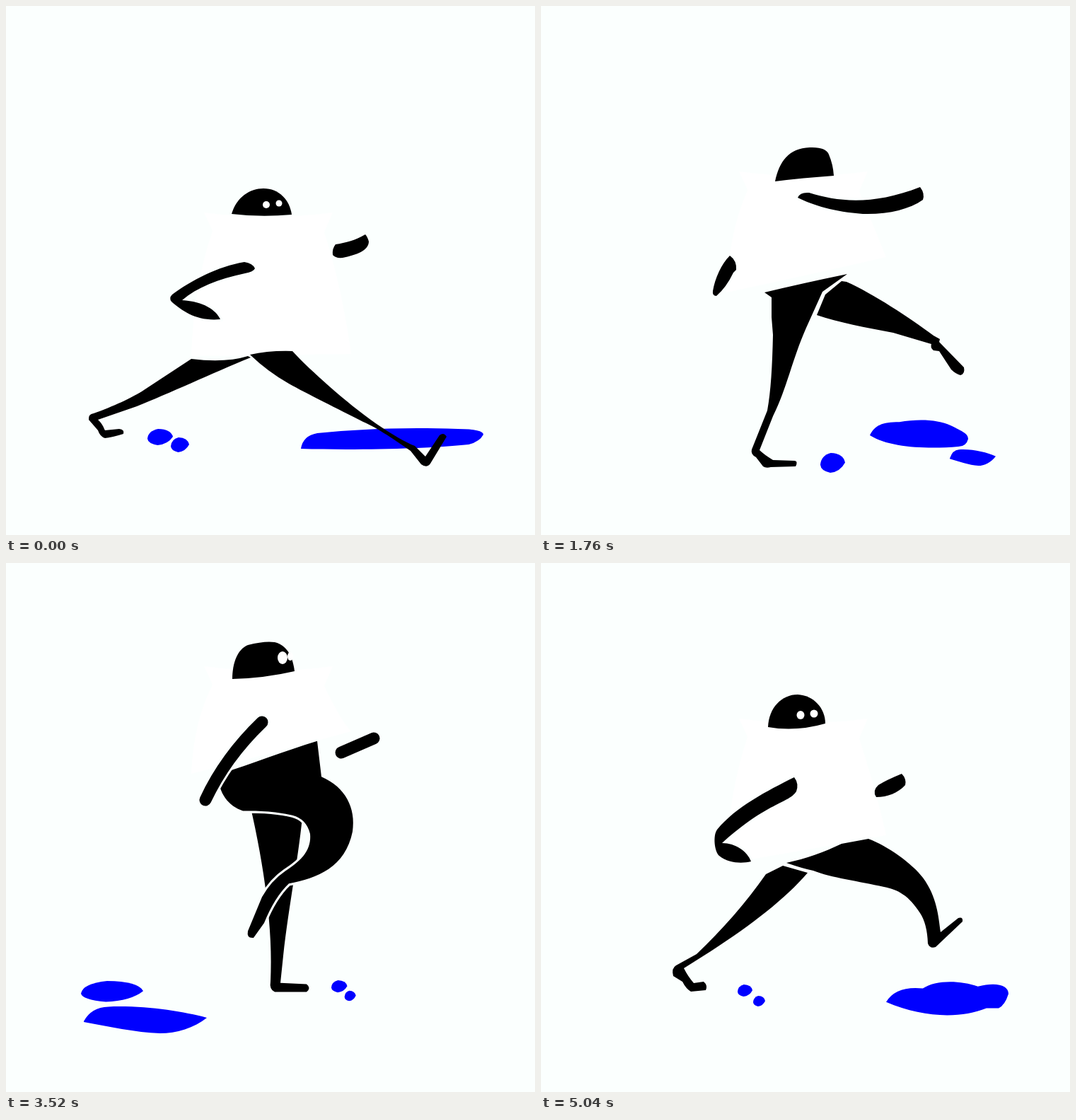
An HTML page with a canvas for the animation above (5120 ms loop, 748x748 px).

```html
<!DOCTYPE html>
<html lang="en">
<head>
<meta charset="utf-8">
<title>Walk cycle</title>
<style>
html, body { margin: 0; width: 100%; height: 100%; overflow: hidden; background: #fbfffe; }
canvas { display: block; width: 748px; height: 748px; }
</style>
</head>
<body>
<canvas id="stage" width="748" height="748"></canvas>
<script>
const ctx = document.getElementById('stage').getContext('2d');
const PAPER = '#fbfffe', INK = '#000', WATER = '#00f';
const STEP = 80, CYCLE = 16;

// Eight leg poses make one step; the second step repeats them on the other side.
// legs: [drawn behind, drawn in front]; hem: shirt edge at left and right.
const POSES = [
  { top: 258, hem: [495, 492], pivot: 495, legs: [
    'M262 499Q310 505 342 495L346 497C290 520 230 548 185 566L130 585C136 590 138 596 140 600L160 598Q168 599 166 605Q150 610 140 611Q133 609 130 600L117 585Q116 577 124 576C150 567 180 553 195 543Q230 520 262 499Z',
    'M345 493Q372 487 405 488C430 515 480 560 524 591C548 607 565 617 578 622L593 637L613 607Q619 602 623 609L600 647Q595 654 587 648L572 629C545 610 520 594 505 588C470 570 425 548 400 534Q370 517 345 493Z'] },
  { top: 258, hem: [498, 475], pivot: 490, legs: [
    'M262 497Q320 500 345 510C300 540 240 555 190 561L150 595Q140 600 138 592L180 550Q230 530 262 497Z',
    'M300 492Q370 488 425 478C455 520 505 565 527 600Q545 628 556 642L596 644Q604 648 598 655L552 656Q543 650 538 638C515 605 490 592 470 575C430 545 380 525 340 505Z'] },
  { top: 235, hem: [430, 414], pivot: 425, legs: [
    'M367 492L383 506L362 515C335 524 310 529 287 532Q260 550 238 564Q230 570 226 563Q225 557 232 553L275 527Q278 519 290 520C315 516 330 512 340 510Q355 498 367 492ZM399 422L442 418L436 434ZM417 455L438 456L438 479Z',
    'M294 431Q330 431 365 426L374 440L412 455L436 485L460 535L480 575L497 625Q505 642 512 645L545 644Q554 645 554 651Q550 656 540 656L505 656Q497 655 490 640C475 615 465 590 455 575C430 552 405 525 390 505Q375 485 360 474C340 474 320 464 308 455Q296 443 294 431Z'] },
  { top: 172, hem: [375, 345], pivot: 365, legs: [
    'M368 440L405 478Q408 500 385 505C350 515 330 525 310 555L285 578Q276 580 277 571C295 540 320 505 350 490Q365 470 368 440Z',
    'M300 375Q370 366 440 352L444 400C456 460 458 540 461 600L463 644L502 645Q508 651 500 656L455 656Q447 652 447 640C440 590 425 530 395 470Q375 440 350 425C315 415 300 400 300 375Z'] },
  { top: 129, hem: [315, 255], pivot: 295, legs: [
    'M345 365L420 372C415 440 400 520 392 600L388 642L425 644Q432 650 425 656L380 656Q372 652 374 640C378 560 365 460 345 365Z',
    'M300 315C350 300 395 283 440 270L446 318C480 332 495 360 490 392C480 440 440 455 400 462Q380 480 365 515L350 535Q340 536 342 526L362 480Q375 458 395 445C420 430 432 415 430 395Q425 375 405 370C380 364 350 364 335 364C315 358 300 340 300 315Z'] },
  { top: 135, hem: [325, 250], pivot: 300, legs: [
    'M350 369L380 369Q405 370 416 381C413 405 405 435 400 450Q388 458 386 467L384 484C370 510 360 520 353 535Q340 570 315 592L355 595Q362 600 358 606L318 607Q310 606 302 594Q299 587 305 583C330 555 350 520 352 450Q354 400 350 369Z',
    'M302 320C350 304 395 287 442 276L444 322Q460 325 466 330C490 335 504 355 504 378C495 420 460 452 417 455Q402 460 398 475L390 513Q387 519 381 518Q378 515 379 507L386 470Q390 458 400 452C420 437 440 420 441 395Q440 378 425 375C405 366 380 363 345 366C320 362 300 345 302 320Z'] },
  { top: 200, hem: [405, 355], pivot: 390, legs: [
    'M316 405L326 412L326 440L328 465C327 510 325 545 320 572L298 627Q296 634 304 638L314 651Q318 654 325 652L360 651Q364 643 358 643L328 642Q315 634 309 628L328 580C348 540 355 500 375 455L398 404L433 379Q370 392 316 405Z',
    'M425 389L432 390C470 407 520 440 555 466L564 471L563 475L598 511Q600 520 593 522Q586 520 580 514L563 488L555 487Q550 483 552 478L498 462C460 455 420 447 390 437L402 408Z'] },
  { top: 186, hem: [425, 385], pivot: 425, legs: [
    'M318 440L342 428L377 438C345 475 300 510 240 549L202 573Q208 585 216 594L230 592Q236 597 233 604L212 606Q205 602 200 592L187 584Q184 573 191 569L220 553C255 520 290 480 318 440Z',
    'M347 424C375 418 400 409 425 397L463 390C490 400 525 425 540 445C560 472 562 500 565 522L590 502Q597 500 596 507L558 543Q550 546 547 538Q546 510 536 495C520 470 505 462 485 458C450 450 410 445 385 435Q370 432 347 424Z'] }
];

// Vertical stretch of each leg, because the two feet follow separate ground lines.
const STRETCH = { 5: [1.1, 1], 7: [1.09, 1], 8: [1.45, .7], 9: [1.35, .7], 10: [1.2, .775],
  11: [1.1, .856], 12: [.91, 1.05], 14: [.96, 1] };

const TOPS = [258, 258, 235, 172, 129, 152, 200, 215, 262, 258, 238, 165, 112, 135, 165, 186];

const HEADS = [
  [258, 'M319 294C326 270 345 258 364 258C386 258 401 274 404 295Q360 299 319 294Z'],
  [235, 'M328 285C328 262 332 235 366 235C392 235 402 255 409 280Q370 285 345 281Q335 282 328 285Z'],
  [200, 'M331 248C337 220 350 201 380 200Q403 199 407 210Q413 224 414 240Q370 243 331 248Z'],
  [135, 'M320 187C320 165 327 145 342 139Q365 133 380 135C400 140 406 160 408 176Q365 186 320 187Z'],
  [186, 'M321 232C322 205 340 186 363 186C385 187 402 205 402 227Q360 239 321 232Z']
];
const HEAD_AT = [0, 0, 1, 1, 2, 2, 2, 2, 2, 2, 2, 2, 3, 3, 4, 4];

// Per step: x, distance below the head top, x radius, y radius.
const EYES = {
  0: [[368, 23, 5, 5], [386, 21, 4.5, 4.5]],
  1: [[377, 24, 6, 6], [393, 23, 5, 5]],
  2: [[388, 37, 8, 8], [402, 37, 5.5, 6.5]],
  3: [[399, 37, 6, 7]],
  12: [[391, 22, 7, 9], [402, 20, 4, 6]],
  13: [[380, 21, 8, 10], [394, 19, 6.5, 7]],
  14: [[373, 27, 6, 7], [389, 24, 5.5, 6]],
  15: [[367, 29, 5.5, 6], [386, 27, 5.5, 5.5]]
};

// Closed paths are filled, open ones are drawn with a round brush.
const NEAR_ARM = [
  'M352 371Q349 364 337 362C300 368 262 388 235 408Q230 413 234 418C250 432 270 446 303 443C297 430 280 418 249 416C270 398 300 386 338 378Q350 376 352 371Z',
  'M345 370Q280 395 265 428L325 446',
  'M356 359C366 376 374 395 386 414C395 424 430 430 457 451C430 458 390 447 374 432C357 414 345 390 347 373Q349 363 356 359Z',
  'M357 295Q365 360 435 380',
  'M360 208Q385 268 460 272',
  'M367 228Q425 272 510 245',
  'M363 271Q366 263 379 264C420 277 470 282 536 256Q543 265 540 274C520 288 490 295 455 294C415 291 385 282 363 271Z',
  'M367 300Q430 328 510 286',
  'M362 345Q430 390 490 350',
  'M358 345Q400 415 475 400',
  'M355 345Q375 420 430 438',
  'M355 250Q350 320 375 380',
  'M362 225Q310 275 282 335',
  'M364 246Q372 252 371 261Q368 268 350 276C310 295 265 320 225 357Q226 342 238 330C275 295 320 270 364 246Z',
  'M356 282Q290 310 240 372',
  'M358 303Q365 312 361 323C350 340 320 338 256 396C275 396 292 408 297 422C285 425 265 425 252 414C245 408 243 385 249 377C275 345 320 322 358 303Z'
];
const FAR_ARM = {
  0: 'M508 323C495 331 480 335 466 337Q461 343 462 352Q466 357 476 356C495 352 513 346 513 333Q511 326 508 323Z',
  1: 'M474 372L496 368',
  5: 'M264 306L243 352',
  6: 'M267 353Q277 360 276 373L272 377Q262 398 248 410Q242 410 243 403C246 385 255 365 267 353Z',
  7: 'M258 372L241 412',
  8: 'M247 420L244 445',
  12: 'M474 268L520 248',
  13: 'M545 231Q549 238 548 247C535 270 505 280 472 279Q468 276 474 272Q500 260 545 231Z',
  14: 'M482 296L523 273',
  15: 'M510 298Q517 305 515 314C505 325 490 331 474 331Q468 322 477 314Q488 307 510 298Z'
};

// Puddle outlines in a unit box.
const SHAPES = {
  puddle: 'M0 .55C.05 .2 .12 .08 .3 .08C.5 -.04 .7 0 .82 .2C.95 .42 1 .5 1 .68Q.98 .95 .9 .95C.6 1.04 .2 1 0 .55Z',
  bumpy: 'M0 .6Q.08 .12 .3 .2C.4 -.05 .6 -.05 .75 .14C.9 0 1 .1 1 .36Q.97 .7 .92 .78L.82 .78C.6 1.1 .3 1.06 0 .6Z',
  slab: 'M0 .97Q.01 .35 .09 .23C.32 .04 .55 -.06 .86 .03Q1 .04 1 .3Q.98 .63 .92 .77C.7 .97 .3 1.05 0 .97Z',
  leaf: 'M0 .55Q.06 .03 .2 .01C.5 -.04 .8 .18 1 .42C.9 .8 .75 1 .62 1C.42 .97 .2 .75 0 .58Z',
  pebble: 'M0 .6Q.03 .12 .42 0Q.92 .02 1 .48Q.8 .95 .4 1Q.02 .9 0 .6Z'
};

// Keys: step, left, top, right, bottom, optional shape.
const PUDDLES = [
  ['puddle', [14, 560, 600, 661, 635, 'bumpy'], [15, 488, 592, 661, 640, 'bumpy'], [16, 417, 597, 675, 627, 'slab'],
    [18, 215, 588, 426, 624], [20, 93, 592, 235, 622], [21, 93, 600, 130, 618]],
  ['puddle', [4, 598, 592, 664, 622], [6, 465, 585, 604, 625], [11, 122, 588, 262, 622], [13, 90, 594, 126, 619, 'pebble']],
  ['leaf', [6, 578, 627, 643, 650], [7, 520, 627, 655, 660], [8, 425, 627, 660, 668],
    [12, 110, 627, 284, 665], [13, 84, 627, 218, 665], [14, 82, 632, 150, 662]],
  ['pebble', [2, 622, 634, 664, 663], [6, 395, 632, 430, 660], [11, 93, 630, 130, 655]],
  ['pebble', [9, 655, 590, 685, 608], [13, 395, 590, 415, 607], [15, 278, 596, 299, 613],
    [16, 200, 598, 236, 621], [17, 88, 604, 120, 626]],
  ['pebble', [10, 610, 604, 628, 618], [13, 413, 605, 428, 620], [15, 300, 612, 317, 627],
    [16, 233, 610, 259, 631], [18, 89, 618, 115, 642]]
];

function fillPath(d, color, dy = 0, outlined = false) {
  const path = new Path2D(d);
  ctx.save();
  ctx.translate(0, dy);
  if (outlined) {
    ctx.strokeStyle = PAPER;
    ctx.lineWidth = 6;
    ctx.stroke(path);
  }
  ctx.fillStyle = color;
  ctx.fill(path);
  ctx.restore();
}

function drawArm(d) {
  if (!d) return;
  if (d.endsWith('Z')) return fillPath(d, INK, 0, true);
  const path = new Path2D(d);
  ctx.lineCap = ctx.lineJoin = 'round';
  for (const [color, width] of [[PAPER, 23], [INK, 17]]) {
    ctx.strokeStyle = color;
    ctx.lineWidth = width;
    ctx.stroke(path);
  }
}

function drawPuddle([shape, ...keys], step) {
  const s = step < keys[0][0] ? step + CYCLE : step;
  const next = keys.findIndex(key => key[0] >= s);
  if (next < 0) return;
  const b = keys[next], a = keys[Math.max(0, next - 1)];
  const mix = a === b ? 0 : (s - a[0]) / (b[0] - a[0]);
  const [left, top, right, bottom] = [1, 2, 3, 4].map(i => a[i] + (b[i] - a[i]) * mix);
  ctx.save();
  ctx.translate(left, top);
  ctx.scale(right - left, bottom - top);
  fillPath(SHAPES[b[5] || shape], WATER);
  ctx.restore();
}

function drawShirt(top, [left, right]) {
  const neck = top + 40, middle = (neck + left) / 2;
  fillPath(`M280 ${neck - 6}Q370 ${neck + 6} 462 ${neck - 6}L450 ${neck + 22}Q475 ${middle} 488 ${right}` +
    `Q380 ${(left + right) / 2} 262 ${left}Q265 ${middle} 292 ${neck + 20}Z`, '#fff');
}

function drawLeg(d, pivot, dy, stretch, outlined) {
  ctx.save();
  ctx.translate(0, pivot + dy);
  ctx.scale(1, stretch);
  fillPath(d, INK, -pivot, outlined);
  ctx.restore();
}

function draw(step) {
  const pose = POSES[step % 8], top = TOPS[step], dy = top - pose.top;
  const stretch = STRETCH[step] || [1, 1];
  ctx.fillStyle = PAPER;
  ctx.fillRect(0, 0, 748, 748);
  drawShirt(top, pose.hem.map(y => y + dy));
  PUDDLES.forEach(puddle => drawPuddle(puddle, step));
  drawArm(FAR_ARM[step]);
  pose.legs.forEach((leg, i) => drawLeg(leg, pose.pivot, dy, stretch[i], i === 1 && step % 8 > 0));
  const [headTop, head] = HEADS[HEAD_AT[step]];
  fillPath(head, INK, top - headTop);
  ctx.fillStyle = '#fff';
  for (const [x, y, rx, ry] of EYES[step] || []) {
    ctx.beginPath();
    ctx.ellipse(x, top + y, rx, ry, 0, 0, 2 * Math.PI);
    ctx.fill();
  }
  drawArm(NEAR_ARM[step]);
}

function tick() {
  draw(Math.floor(performance.now() / STEP) % CYCLE);
  requestAnimationFrame(tick);
}
tick();
</script>
</body>
</html>
```
